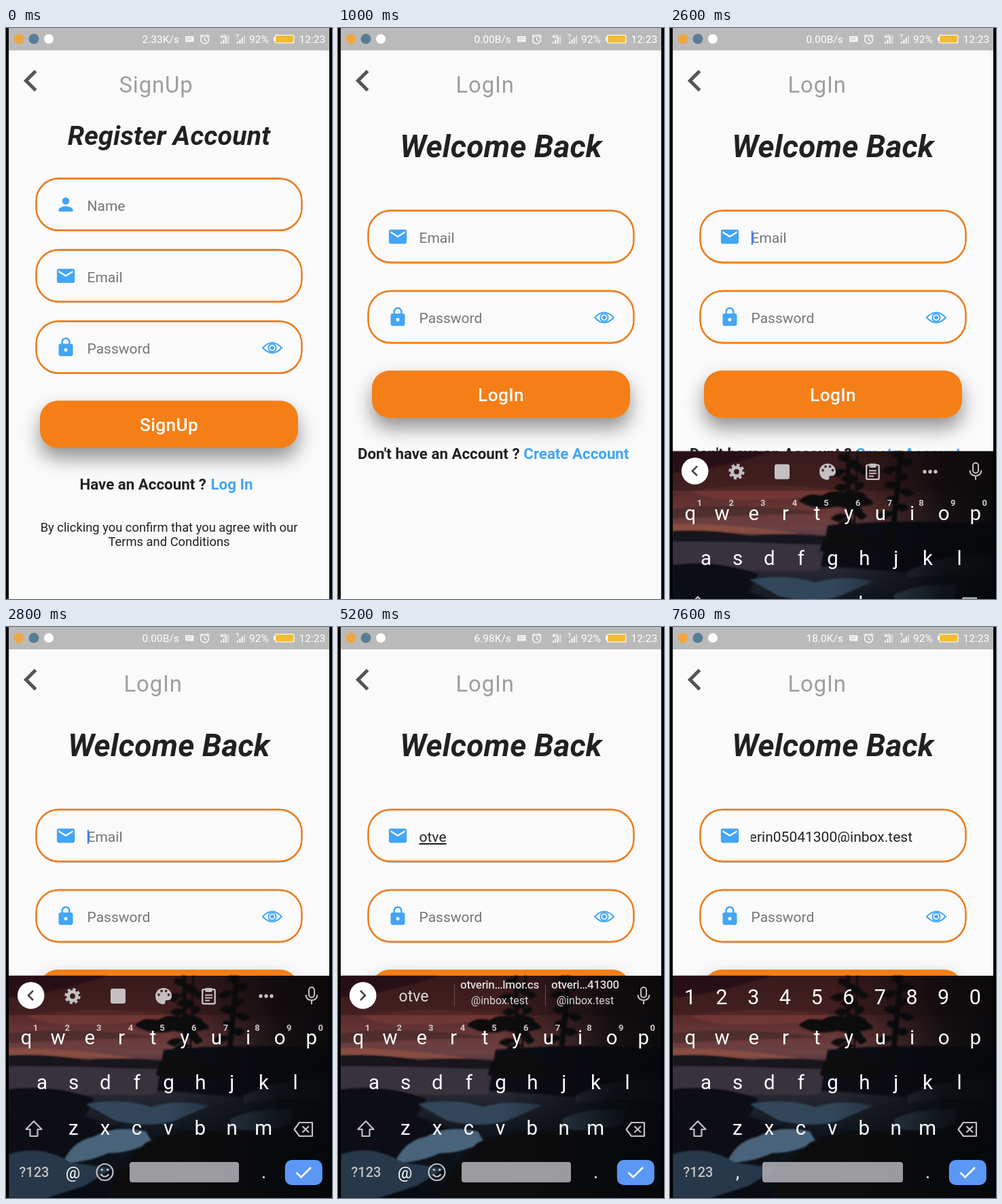
An HTML page that plays this animation: 480 px wide and 840 px high, repeating every 8 s.

```html
<!DOCTYPE html>
<html lang="en">
<head>
<meta charset="utf-8">
<title>Sign up and log in</title>
<style>
  html, body { margin: 0; width: 100%; height: 100%; overflow: hidden; background: #000; }
  svg { display: block; width: 100vw; height: 100vh; font-family: Roboto, sans-serif; }
  text { white-space: pre; }
</style>
</head>
<body>
<svg id="stage" viewBox="0 0 480 840">
  <defs>
    <clipPath id="screen"><rect x="4" width="472" height="840"/></clipPath>
    <clipPath id="field"><rect x="119" y="290" width="300" height="27"/></clipPath>
    <filter id="soft" x="-20%" y="-80%" width="140%" height="260%"><feGaussianBlur stdDeviation="14"/></filter>
    <filter id="haze" x="-10%" y="-10%" width="120%" height="120%"><feGaussianBlur stdDeviation="1.2"/></filter>
    <linearGradient id="sky" x1="0" y1="0" x2="0" y2="1">
      <stop offset="0" stop-color="#4a2023"/><stop offset=".17" stop-color="#58292a"/>
      <stop offset=".28" stop-color="#6b3a39"/><stop offset=".35" stop-color="#6a4145"/>
      <stop offset=".42" stop-color="#3a2d38"/><stop offset=".55" stop-color="#242732"/>
      <stop offset=".7" stop-color="#10161e"/><stop offset="1" stop-color="#080c12"/>
    </linearGradient>
    <linearGradient id="dusk">
      <stop offset=".5" stop-color="#06080b" stop-opacity="0"/>
      <stop offset=".85" stop-color="#06080b" stop-opacity=".85"/>
      <stop offset="1" stop-color="#06080b" stop-opacity=".95"/>
    </linearGradient>
  </defs>
  <g clip-path="url(#screen)">
    <g id="signup"></g>
    <g id="login"></g>
    <g id="keys"></g>
    <g id="status"></g>
    <circle id="touch" r="14" fill="#d8c8d4" stroke="#fff" stroke-opacity=".5" opacity=".3"/>
  </g>
</svg>
<script>
const LOOP = 8000, BLUE = '#42a5f5', ORANGE = '#f57f17', INK = '#212121';
const NAME = 'otverin', MAIL = NAME + '05041300@inbox.test';
const $ = id => document.getElementById(id);

const text = (x, y, size, str, fill, more = '') =>
  `<text x="${x}" y="${y}" font-size="${size}" fill="${fill}" ${more}>${str}</text>`;
const mid = (x, y, size, str, fill, more = '') =>
  text(x, y, size, str, fill, 'text-anchor="middle" ' + more);
const rect = (x, y, w, h, fill, rx = 0, more = '') =>
  `<rect x="${x}" y="${y}" width="${w}" height="${h}" rx="${rx}" fill="${fill}" ${more}/>`;
const disc = (x, y, r, fill, more = '') =>
  `<circle cx="${x}" cy="${y}" r="${r}" fill="${fill}" ${more}/>`;
const line = (d, color, w, more = '') =>
  `<path d="${d}" fill="none" stroke="${color}" stroke-width="${w}" ${more}/>`;
const blob = (d, fill, more = '') => `<path d="${d}" fill="${fill}" ${more}/>`;

const ICONS = {
  Name: 'M12 12c2.21 0 4-1.79 4-4s-1.79-4-4-4-4 1.79-4 4 1.79 4 4 4zm0 2c-2.67 0-8 1.34-8 4v2h16v-2c0-2.66-5.33-4-8-4z',
  Email: 'M20 4H4c-1.1 0-2 .9-2 2v12c0 1.1.9 2 2 2h16c1.1 0 2-.9 2-2V6c0-1.1-.9-2-2-2zm0 4l-8 5-8-5V6l8 5 8-5v2z',
  Password: 'M18 8h-1V6c0-2.76-2.24-5-5-5S7 3.24 7 6v2H6c-1.1 0-2 .9-2 2v10c0 1.1.9 2 2 2h12c1.1 0 2-.9 2-2V10c0-1.1-.9-2-2-2zm-6 9c-1.1 0-2-.9-2-2s.9-2 2-2 2 .9 2 2-.9 2-2 2zm3.1-9H8.9V6c0-1.71 1.39-3.1 3.1-3.1s3.1 1.39 3.1 3.1v2z'
};

function eye(x, y) {
  return line(`M${x - 14} ${y}Q${x} ${y - 15} ${x + 14} ${y}Q${x} ${y + 15} ${x - 14} ${y}Z`, BLUE, 2, 'stroke-linejoin="round"') +
    disc(x, y, 5.6, 'none', `stroke="${BLUE}" stroke-width="2"`) + disc(x, y, 2.8, BLUE);
}

function field(top, label, id = '') {
  const cy = top + 39.5;
  return rect(44.5, top + 1.9, 391, 76.3, 'none', 33, 'stroke="#6f86a6" stroke-width="1.8"') +
    rect(44.5, top + 1.2, 391, 76.3, 'none', 33, `stroke="${ORANGE}" stroke-width="2.4"`) +
    `<path transform="translate(72.3 ${cy - 15.6}) scale(1.311)" fill="${BLUE}" d="${ICONS[label]}"/>` +
    text(119.5, cy + 9, 21, label, '#757575', id && `id="${id}"`) +
    (label === 'Password' ? eye(392, cy + 1) : '');
}

function button(top, label) {
  return rect(50, top + 15, 380, 69.5, '#000', 26, 'opacity=".42" filter="url(#soft)"') +
    rect(50, top, 380, 69.5, ORANGE, 26) +
    mid(240, top + 45, 26.2, label, '#fff', 'font-weight="500" letter-spacing=".4"');
}

function page(bar, barX, head, headY, size) {
  return rect(4, 0, 472, 840, '#fafafa') +
    line('M43.7 63.2L29.4 77.5L43.7 91.8', '#555', 5) +
    text(barX, 95, 32.8, bar, '#9e9e9e', 'letter-spacing=".9"') +
    mid(240, headY, size, head, INK, 'font-weight="700" font-style="italic" letter-spacing=".15"');
}

function footer(x, linkX, y, ask, link) {
  return text(x, y, 22.3, ask, INK, 'font-weight="700"') + text(linkX, y, 22.3, link, BLUE, 'font-weight="700"');
}

$('signup').innerHTML = page('SignUp', 166.5, 'Register Account', 171.5, 39.3) +
  field(220, 'Name') + field(325, 'Email') + field(430, 'Password') + button(548.3, 'SignUp') +
  footer(108.5, 301.5, 679, 'Have an Account ?', 'Log In') +
  mid(240, 740.5, 18.35, 'By clicking you confirm that you agree with our', INK) +
  mid(240, 761.5, 18.35, 'Terms and Conditions', INK);

$('login').innerHTML = page('LogIn', 173.5, 'Welcome Back', 190.3, 45.9) +
  field(267.3, 'Email', 'hint') + field(385.5, 'Password') + button(504, 'LogIn') +
  footer(29, 273.3, 634, "Don't have an Account ?", 'Create Account') +
  `<g clip-path="url(#field)">${text(357, 316, 21, MAIL, INK, 'id="mail" text-anchor="end"')}</g>` +
  text(119.5, 316, 21, '', INK, 'id="typed" text-decoration="underline"') +
  rect(0, 0, 2.2, 20.5, '#4285f4', 0, 'id="caret"');

// Status bar
function bars(x) {
  return [3, 6, 9, 12].map((h, i) => rect(x + i * 3.4, 23 - h, 2, h, '#fff', 0, `opacity="${i > 2 ? .5 : .9}"`)).join('');
}
$('status').innerHTML = rect(4, 0, 472, 33, '#bababa') +
  disc(19, 16, 7.5, '#eca744') + disc(41, 16, 7.5, '#5a7d96') + disc(63, 16, 7, '#fff') +
  text(200.5, 22, 15.5, '', '#fff', 'id="speed"') +
  rect(264, 12, 12.5, 8.5, '#f4f4f4', 1) + line('M266 14.5h8M266 17h8', '#b0b0b0', 1, 'stroke-dasharray="1.5 1"') +
  disc(292.5, 17, 6, 'none', 'stroke="#fff" stroke-width="1.4"') +
  line('M292.5 13.5v4l2.6 1.6M285.5 12.5l3.5-3M299.5 12.5l-3.5-3', '#fff', 1.3) +
  text(315, 15, 8, '4G', '#fff', 'font-weight="700"') + bars(316) +
  text(338, 17, 11, '?', '#fff') + bars(340) +
  text(358, 22, 15.5, '92%', '#fff') +
  rect(396.5, 10.5, 27.5, 11.5, '#f0bd35', 2, 'stroke="#fff" stroke-width="1.2"') + rect(394, 13.5, 2, 5.5, '#fff') +
  text(431.5, 22, 15.5, '12:23', '#fff');

// Keyboard backdrop: dusk sky, lake, pines and snow
function pine(x, w, lean, top, reach) {
  let d = '';
  for (let i = 0; i < 9; i++) {
    const side = i % 2 ? 1 : -1, y = top + i * 11;
    d += blob(`M${x + lean * (y - 513) / 140} ${y}q${side * reach} -8 ${side * (reach + i % 3 * 6)} 4q${-side * reach} 8 ${-side * reach} 3Z`, '#0c0a0d');
  }
  return line(`M${x} 513L${x + lean} 655`, '#0b0a0d', w) + d;
}

function scenery() {
  return rect(4, 513, 472, 327, 'url(#sky)') +
    '<g filter="url(#haze)">' +
    blob('M4 513H150Q70 540 4 545Z', '#1d0c10', 'opacity=".5"') +
    blob('M30 572Q120 556 250 570Q190 586 120 584Q70 588 30 572Z', '#8c4640', 'opacity=".4"') +
    blob('M4 598Q90 586 230 604Q120 606 4 612Z', '#3c2329', 'opacity=".6"') +
    blob('M4 620Q80 618 190 634L4 634Z', '#a3593f', 'opacity=".55"') +
    blob('M4 630Q60 627 120 637Q180 632 250 640V650Q100 650 4 646Z', '#17161d') +
    blob('M4 646Q110 645 236 652L220 688Q110 690 4 684Z', '#38313c') +
    blob('M232 622Q330 612 476 620V705Q350 690 222 682Z', '#101117') +
    blob('M4 680Q70 672 130 694L116 720L176 742L100 790L4 770Z', '#0b1017') +
    blob('M118 702Q170 692 214 706Q250 694 300 704L250 726Q210 738 160 726Z', '#33475a') +
    blob('M84 788Q98 756 130 750Q160 732 206 742L214 756Q186 774 150 774Q120 788 84 788Z', '#48647a') +
    blob('M330 724Q366 706 424 710L418 732Q380 744 330 738Z', '#3c5263') +
    blob('M350 690Q400 662 476 666V700Q410 690 350 700Z', '#363c48') +
    blob('M4 776Q50 760 96 788L158 796L116 822L60 840H4Z', '#26394a') +
    blob('M206 758Q270 732 330 746Q400 740 476 764V840H150Q170 790 206 758Z', '#090c11') +
    blob('M190 586Q200 572 224 578Q238 566 262 576Q290 574 300 590Q270 600 246 594Q214 602 190 586Z', '#100c10') +
    pine(262, 6, 2, 520, 15) + pine(276, 3, -6, 528, 12) + pine(340, 8, -14, 516, 14) +
    blob('M226 640Q262 616 300 640L320 660H220Z', '#0c0c11') +
    '</g>' +
    rect(4, 513, 472, 327, 'url(#dusk)') + rect(4, 513, 472, 58, '#120a0d', 0, 'opacity=".3"');
}

const row = (str, x, y, size, step = 46.65, more = '', fill = '#fff') =>
  [...str].map((c, i) => mid(x + i * step, y, size, c, fill, more)).join('');
const GREY = '#c4c0c2';

function toolbar() {
  return disc(98, 543, 6.4, 'none', `stroke="${GREY}" stroke-width="5"`) +
    disc(98, 543, 10, 'none', `stroke="${GREY}" stroke-width="3.4" stroke-dasharray="4.2 3.654"`) +
    rect(154, 532, 22, 22, GREY, 3) +
    blob('M232 531C225 531 220 536 220 543S225 555 232 555C236 555 233 550 236 549H239C242 549 244 546 244 543C244 536 239 531 232 531Z', GREY) +
    [[225, 541], [229, 535.5], [235.5, 535.5], [239.5, 541]].map(p => disc(...p, 1.9, '#4a2a2e')).join('') +
    rect(289.2, 533.2, 18.5, 21, 'none', 2, `stroke="${GREY}" stroke-width="2.4"`) + rect(293.5, 531, 10, 6, GREY, 1) +
    line('M293 541.5h11M293 545.5h11M293 549.5h7', GREY, 2) +
    [375, 383, 391].map(x => disc(x, 543, 2.7, GREY)).join('');
}

function suggestion(x, top) {
  return mid(x, 532, 17, top, '#dcd8da', 'font-weight="500" letter-spacing="-.3"') + mid(x, 555, 16, '@inbox.test', '#dcd8da');
}

$('keys').innerHTML = scenery() +
  `<g id="plain">` +
    disc(36.7, 542, 19.8, '#fff') + line('', '#444', 2.6, 'id="arrow"') +
    rect(446, 530, 8, 15, 'none', 4, `stroke="${GREY}" stroke-width="2"`) +
    line('M441.5 541Q442 549 450 549T458.5 541M450 549V555', GREY, 2) +
    row('1234567890', 43.5, 593.5, 13, 46.65, 'font-weight="700"', '#cfc8ca') +
    mid(98.5, 811, 24, '@', '#fff') +
    disc(145.5, 802, 12, 'none', `stroke="${GREY}" stroke-width="2.2"`) +
    disc(141.3, 798.5, 1.8, GREY) + disc(149.7, 798.5, 1.8, GREY) +
    line('M139.5 805Q145.5 812 151.5 805', GREY, 2.2) +
    rect(182, 787, 161, 30, '#b4b4ba', 4, 'opacity=".85"') +
    `<g id="tools">${toolbar()}</g>` +
    mid(238.5, 551, 23, '', '#dcd8da', 'id="guess"') +
    `<g id="choices">` + mid(111.5, 551, 23, 'otve', '#dcd8da') +
      line('M171.5 526V558M305.5 526V558', '#6d5055', 1) +
      suggestion(238, NAME + '…lmor.cs') + suggestion(364, 'otveri…41300') + `</g>` +
  `</g><g id="secret">` +
    row('1234567890', 29.5, 554.5, 30.5) + mid(99.5, 811, 26, ',', '#fff') +
    rect(136, 787, 207, 30, '#b4b4ba', 4, 'opacity=".85"') +
  `</g>` +
  row('qwertyuiop', 30, 614, 29.5) + row('asdfghjkl', 53, 680, 29.5) + row('zxcvbnm', 99.3, 747, 29.5) +
  line('M41 727L52.5 739H46.5V749H35.5V739H29.5Z', GREY, 2.2, 'stroke-linejoin="round"') +
  line('M424.5 739L432 729H451V749H432Z M436.5 734.5L446 743.5M446 734.5L436.5 743.5', GREY, 2.2, 'stroke-linejoin="round"') +
  mid(41.5, 809, 20, '?123', GREY, 'font-weight="500"') + mid(379.5, 811, 27, '.', '#fff') +
  rect(410.8, 784, 55, 37, '#5b97f5', 10) + line('M427.5 802.5L434.5 809.5L449 795', '#fff', 2.6);

// Time
const show = (id, on) => $(id).style.display = on ? '' : 'none';
const ease = p => p * p * (3 - 2 * p);
const part = (t, a, b) => Math.min(1, Math.max(0, (t - a) / (b - a)));
const last = (list, t) => list.filter(e => e[0] <= t).pop();

const SPEED = [[0, '2.33K/s'], [600, '0.00B/s'], [3200, '48.6K/s'], [4400, '6.98K/s'], [6600, '18.0K/s']];
const INPUT = [[0, ''], [3580, 'o'], [4080, 'ot'], [4380, 'otv'], [4680, 'otve'], [6100, '']];
const FOCUS = [2350, 3580, 4080, 4380, 4680, 6100, 6980];
const TAPS = [[250, 332, 671], [2130, 220, 308], [3450, 402, 606], [3960, 208, 615], [4280, 239, 738],
  [4560, 123, 606], [5980, 364, 542], [6850, 220, 427]];
const DONE = 6100, SECRET = 7000;

function draw(t) {
  const p = part(t, 400, 700), up = 1 - Math.pow(1 - p, 3);
  show('login', p > 0);
  $('login').setAttribute('opacity', ease(p));
  $('login').setAttribute('transform', `translate(0 ${(1 - up) * 210})`);

  const rise = 1 - Math.pow(1 - part(t, 2500, 2740), 2);
  show('keys', rise > 0);
  $('keys').setAttribute('transform', `translate(0 ${(1 - rise) * 327})`);

  const word = last(INPUT, t)[1], done = t >= DONE;
  $('typed').textContent = word;
  show('hint', !word && !done);
  show('mail', done);

  const began = FOCUS.filter(f => f <= t).pop();
  const secret = t >= FOCUS[6];
  show('caret', began !== undefined && (t - began) % 1000 < 500);
  $('caret').setAttribute('x', secret ? 119.5 : done ? 357 : word ? 120 + $('typed').getComputedTextLength() : 119.8);
  $('caret').setAttribute('y', secret ? 417 : 298.5);

  const choices = word === 'otve', idle = t < 3580;
  show('plain', t < SECRET);
  show('secret', t >= SECRET);
  show('tools', idle || done);
  show('choices', choices);
  $('guess').textContent = choices ? '' : t >= 3960 && word === 'o' ? 'ot' : word;
  $('arrow').setAttribute('d', idle || done ? 'M40 535L33 542L40 549' : 'M33 535L40 542L33 549');

  $('speed').textContent = last(SPEED, t)[1];
  const tap = last(TAPS, t), down = tap && t - tap[0] < 110;
  show('touch', down);
  if (down) {
    $('touch').setAttribute('cx', tap[1]);
    $('touch').setAttribute('cy', tap[2]);
  }
}

function tick() {
  draw(performance.now() % LOOP);
  requestAnimationFrame(tick);
}
tick();
</script>
</body>
</html>
```
